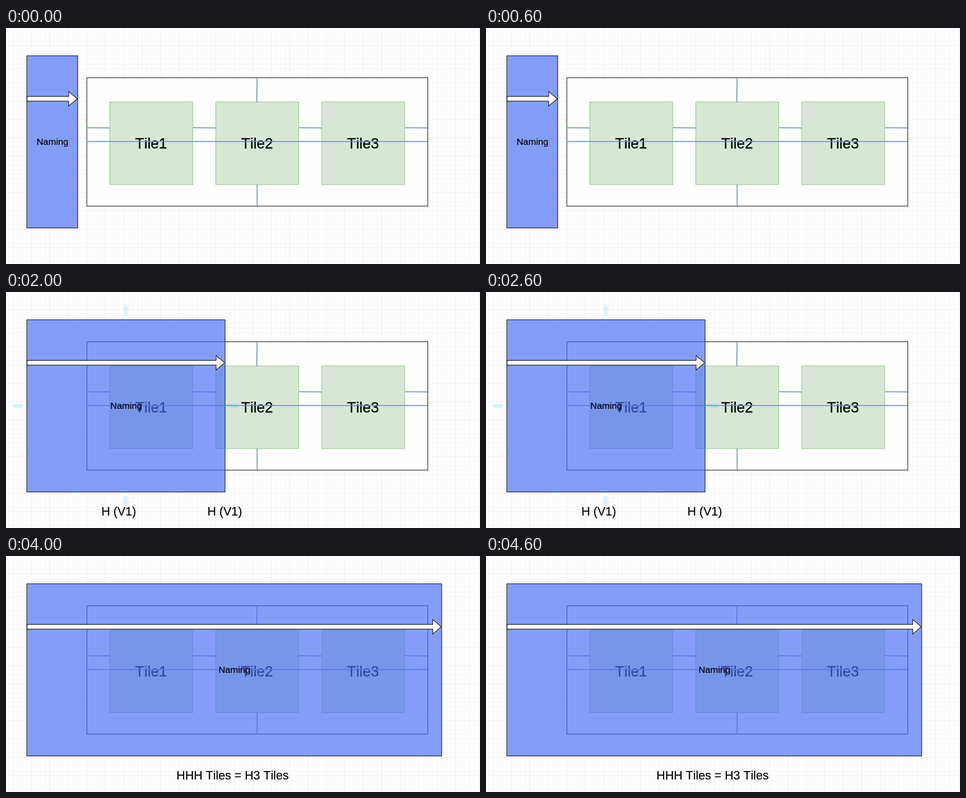
An HTML page that plays this animation: 1058 px wide and 529 px high, repeating every 5000 ms.

```html
<!DOCTYPE html>
<html lang="en">
<head>
<meta charset="utf-8">
<title>Tile naming</title>
<style>
  html, body { margin: 0; width: 100%; height: 100%; overflow: hidden; background: #fefefe; }
  svg { display: block; width: 100vw; height: 100vh; }
  text { font-family: "Liberation Sans", Arial, sans-serif; font-kerning: none; text-anchor: middle; fill: #000; }
  .tile { fill: #d7e6d5; stroke: #8cb876; stroke-width: 1.1; }
  .tile-name { font-size: 32.9px; stroke: #000; stroke-width: .35; }
  .link { stroke: #6c8ebf; stroke-width: 2; fill: none; }
  .outline { stroke: #000; stroke-width: 1.2; }
  .caption { font-size: 26.75px; stroke: #000; stroke-width: .2; }
  .hint { fill: #29b6f2; fill-opacity: .15; }
  .mark { stroke: #29b6f2; stroke-width: 1; fill: none; }
</style>
</head>
<body>
<svg viewBox="0 0 1058 529">
  <defs>
    <pattern id="grid" x="15.3" y="39.2" width="41.15" height="41.15" patternUnits="userSpaceOnUse">
      <path id="minor" stroke="#f7f7f7" fill="none"/>
      <path d="M0 .5H41.15M.5 0V41.15" stroke="#ededed" fill="none"/>
    </pattern>
  </defs>
  <rect width="1054" height="529" fill="url(#grid)"/>
  <rect x="1054" width="4" height="529" fill="#f6f6f6"/>
  <rect x="180.5" y="111.5" width="761" height="287.7" fill="#fefefe" class="outline"/>
  <g id="tiles"></g>
  <path class="link" d="M560.5 111.5L559.7 166M560.5 351V399M180 223.4L232 224M417 223.4L468 224
    M654 223.4L705 224M890 223.4L941 224M180 254.5H941"/>
  <rect id="cover" x="46.5" y="62.3" height="386" fill="#466ef6" fill-opacity=".66" class="outline"/>
  <path id="arrow" fill="#fefefe" class="outline" stroke-linejoin="miter"/>
  <text id="naming" y="262" font-size="20.6" stroke="#000" stroke-width=".2">Naming</text>
  <g id="selection"></g>
  <g id="captions"></g>
</svg>
<script>
const byId = id => document.getElementById(id);
const LEFT = 46.5, TOP = 62.3, HEIGHT = 386;
const TILE_STEP = 236.5, STEP_MS = 1000;
const rightEdges = [160, 252.5, 489, 725.5, 972.5];

byId("minor").setAttribute("d", [1, 2, 3].map(i => {
  const p = i * 10.2875 + .5;
  return `M0 ${p}H41.15M${p} 0V41.15`;
}).join(""));

byId("tiles").innerHTML = [0, 1, 2].map(i => {
  const x = 231.8 + i * TILE_STEP;
  return `<rect class="tile" x="${x}" y="165.8" width="185.2" height="185.2"/>
    <text class="tile-name" x="${x + 92.2}" y="270.3">Tile${i + 1}</text>`;
}).join("");

const caption = (x, words) => `<text class="caption" x="${x}" y="501.3">${words}</text>`;

// Resize hints and connection points around the selected cover.
function selectionMarkup(right) {
  const width = right - LEFT, midX = LEFT + width / 2, midY = TOP + HEIGHT / 2;
  const hint = (x, y, angle) => `<path class="hint" transform="translate(${x} ${y}) rotate(${angle})"
    d="M-12 -4.2H2V-8.2L12 0L2 8.2V4.2H-12Z"/>`;
  const mark = (x, y) => `<path class="mark" d="M${x - 2} ${y - 2}l4 4m0 -4l-4 4"/>`;
  const marks = [.25, .5, .75].map(k => {
    const x = LEFT + width * k, y = TOP + HEIGHT * k;
    return mark(x, TOP) + mark(x, TOP + HEIGHT) + mark(LEFT, y) + mark(right, y);
  });
  return hint(midX, 40.5, -90) + hint(midX, 468.5, 90) +
    hint(26, midY, 180) + hint(509, midY, 0) + marks.join("");
}

let shown = -1;

function draw(step) {
  const right = rightEdges[step], neck = right - 20;
  byId("cover").setAttribute("width", right - LEFT);
  byId("arrow").setAttribute("d",
    `M47 153.3H${neck}V142.6L${right - .8} 158.7L${neck} 174.6V163.9H47Z`);
  byId("naming").setAttribute("x", (LEFT + right) / 2 + .4);
  byId("selection").innerHTML = step === 2 ? selectionMarkup(right) : "";
  byId("captions").innerHTML = step === 4
    ? caption(505.8, "HHH Tiles = H3 Tiles")
    : Array.from({ length: step }, (_, i) => caption(251.7 + i * TILE_STEP, "H (V1)")).join("");
}

function tick() {
  const step = Math.floor(performance.now() / STEP_MS) % rightEdges.length;
  if (step !== shown) draw(shown = step);
  requestAnimationFrame(tick);
}
tick();
</script>
</body>
</html>
```
